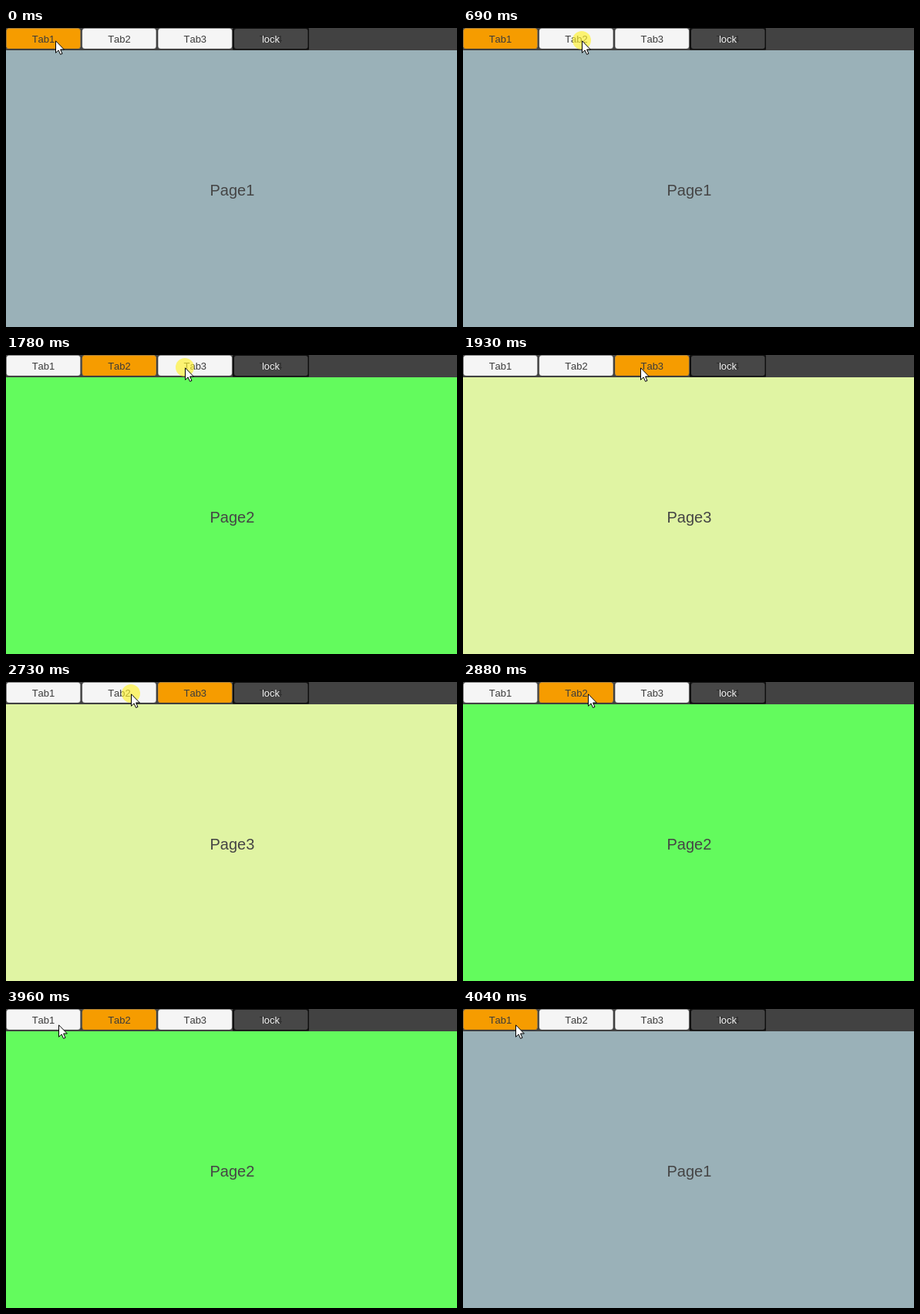
Animation, 585 px wide and 389 px high, one loop 5.2 s. Source, as an HTML page:

```html
<!DOCTYPE html>
<html lang="en">
<head>
<meta charset="utf-8">
<title>Tabs</title>
<style>
html, body { margin: 0; width: 100%; height: 100%; overflow: hidden; background: #424242; }
svg { display: block; width: 585px; height: 389px; }
text {
  font: 13px "Liberation Sans", Arial, sans-serif;
  font-kerning: none;
  text-anchor: middle;
  fill: #3b3b3b;
}
.title { font-size: 20px; fill: #454545; }
.on { fill: #f69c00; }

/* One loop is 5200 ms; every change is a hard step. */
.page, #cursor, #press { animation: 5200ms step-end infinite; }
#p1 { animation-name: first; }
#p2 { animation-name: second; }
#p3 { animation-name: third; }
#cursor { animation-name: travel; }
#press { animation-name: press; }

@keyframes first {
  0%, 77.692% { visibility: visible; }
  14.807% { visibility: hidden; }
  100% { visibility: visible; }
}
@keyframes second {
  0%, 35.576%, 77.692%, 100% { visibility: hidden; }
  14.807%, 55.384% { visibility: visible; }
}
@keyframes third {
  0%, 55.384%, 100% { visibility: hidden; }
  35.576% { visibility: visible; }
}
@keyframes press {
  0%, 14.807%, 35.576%, 55.384%, 76.153%, 100% { visibility: hidden; }
  13.269%, 34.23%, 52.5%, 73.269% { visibility: visible; }
}
@keyframes travel {
  0% { transform: translate(64px, 16px); }
  /* to Tab2 */
  4.423% { transform: translate(88px, 16px); }
  5.961% { transform: translate(132px, 16px); }
  7.5% { transform: translate(154px, 16px); }
  /* to Tab3 */
  20.576% { transform: translate(157px, 16px); }
  22.115% { transform: translate(167px, 16px); }
  23.653% { transform: translate(185px, 16px); }
  25.192% { transform: translate(206px, 16px); }
  26.73% { transform: translate(221px, 16px); }
  28.269% { transform: translate(229px, 16px); }
  29.807% { transform: translate(232px, 16px); }
  /* back to Tab2 */
  37.115% { transform: translate(230px, 16px); }
  38.653% { transform: translate(223px, 16px); }
  40% { transform: translate(210px, 16px); }
  41.538% { transform: translate(193px, 15px); }
  43.076% { transform: translate(179px, 15px); }
  44.615% { transform: translate(167px, 15px); }
  46.346% { transform: translate(162px, 15px); }
  /* back to Tab1 */
  56.73% { transform: translate(158px, 15px); }
  58.269% { transform: translate(144px, 16px); }
  59.807% { transform: translate(120px, 17px); }
  61.153% { transform: translate(96px, 19px); }
  62.692% { transform: translate(79px, 20px); }
  64.038% { transform: translate(72px, 20px); }
  67.307% { transform: translate(71px, 20px); }
  68.846% { transform: translate(69px, 20px); }
  70.384% { transform: translate(68px, 20px); }
  100% { transform: translate(68px, 20px); }
}
</style>
</head>
<body>
<svg viewBox="0 0 585 389">
  <defs>
    <rect id="tab" x=".5" y=".5" width="96" height="26.5" rx="3.5" stroke="#2e2e2e" stroke-opacity=".35" stroke-width=".6"/>
  </defs>

  <rect width="585" height="389" fill="#424242"/>
  <g fill="#f5f5f5">
    <use href="#tab"/>
    <use href="#tab" x="98.3"/>
    <use href="#tab" x="196.7"/>
  </g>

  <g id="p1" class="page">
    <rect y="29" width="585" height="360" fill="#9ab1b8"/>
    <use href="#tab" class="on"/>
    <text class="title" x="293.4" y="218">Page1</text>
  </g>
  <g id="p2" class="page">
    <rect y="29" width="585" height="360" fill="#63fb5d"/>
    <use href="#tab" class="on" x="98.3"/>
    <text class="title" x="293.4" y="218">Page2</text>
  </g>
  <g id="p3" class="page">
    <rect y="29" width="585" height="360" fill="#e0f4a3"/>
    <use href="#tab" class="on" x="196.7"/>
    <text class="title" x="293.4" y="218">Page3</text>
  </g>

  <text x="48.5" y="19">Tab1</text>
  <text x="147" y="19">Tab2</text>
  <text x="245.3" y="19">Tab3</text>

  <rect x="294" width="99" height="28.5" rx="1" fill="#101010"/>
  <rect x="296" y="1" width="95.5" height="26" rx="3" fill="#474747"/>
  <text x="343.5" y="19" style="fill:#2c2c2c">Tab4</text>
  <text x="343.5" y="19" style="fill:#f4f4f4">lock</text>

  <g id="cursor">
    <circle id="press" r="12" fill="#fff22e" fill-opacity=".66"/>
    <path d="M.5 .8V16.3L4.1 12.9L6.6 18.4L9 17.4L6.6 12H11.4Z" fill="#fff" stroke="#000" stroke-linejoin="round"/>
  </g>
</svg>
</body>
</html>
```
